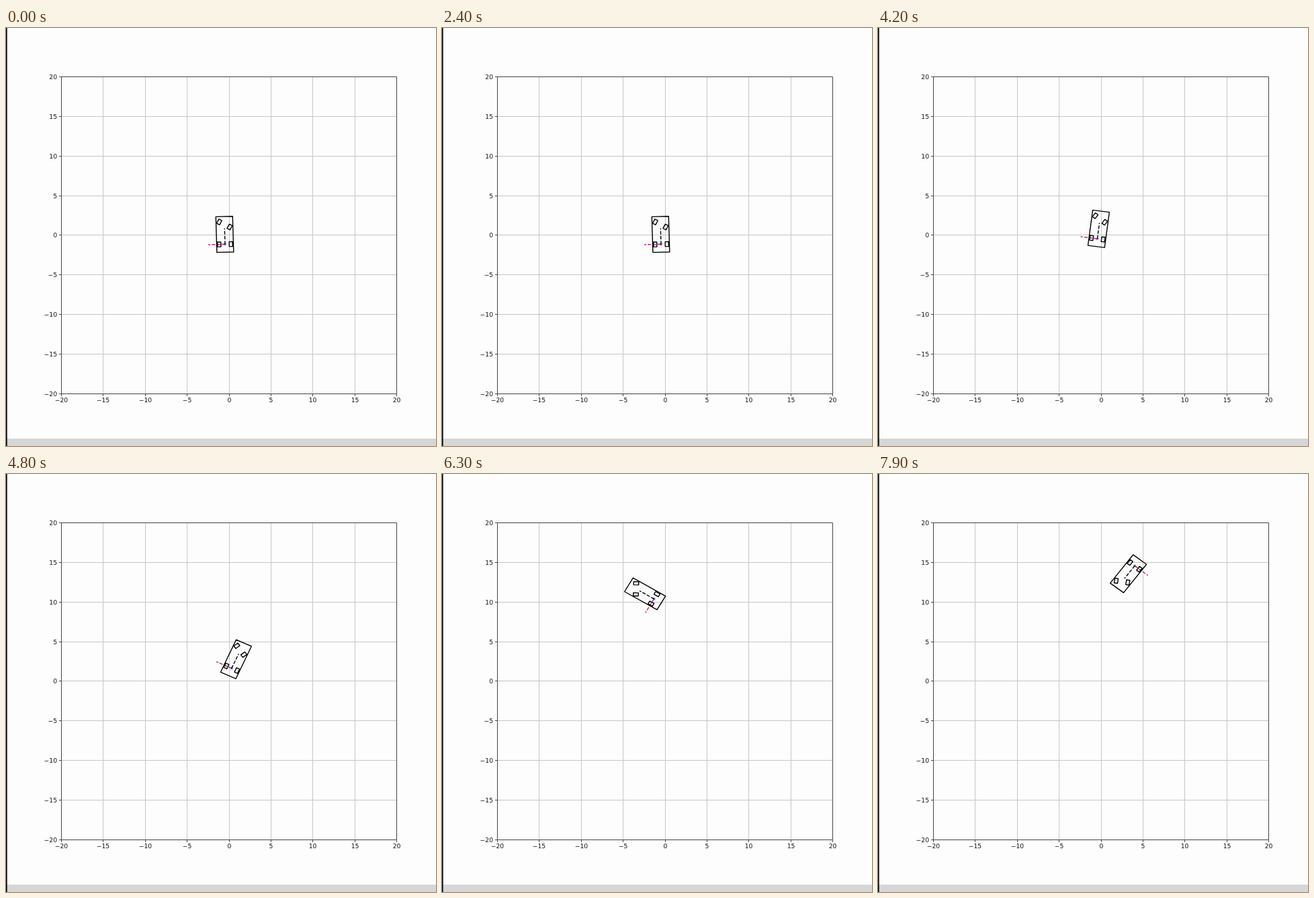
Animation of 640 by 621 pixels, one loop 8000 ms. Source, as an HTML page:

```html
<!DOCTYPE html>
<html lang="en">
<head>
<meta charset="utf-8">
<title>Car kinematics</title>
<style>
  html, body { margin: 0; width: 100%; height: 100%; overflow: hidden; background: #fdfdfd; }
  svg { display: block; width: 640px; height: 621px; }
  text { font: 9.2px "DejaVu Sans", sans-serif; fill: #111; }
  path { fill: none; }
  .grid { stroke: #c6c6c2; }
  .frame { stroke: #444448; }
  .car { stroke: #000; stroke-width: 1.4; stroke-linejoin: round; }
  .dash { stroke: #000; stroke-width: 1.4; stroke-dasharray: 5.1 2.2; }
  .side { stroke: #a8207c; }
</style>
</head>
<body>
<svg viewBox="0 0 640 621">
  <rect width="640" height="621" fill="#fdfdfd"/>
  <rect y="610" width="640" height="11" fill="#d6d6d6"/>
  <rect width="1.7" height="621" fill="#0a0a0a"/>
  <path id="grid" class="grid"/>
  <path id="frame" class="frame"/>
  <g id="labels"></g>
  <path id="star" style="fill:#4a66c8"/>
  <path id="side" class="dash side"/>
  <path id="nose" class="dash"/>
  <path id="car" class="car"/>
  <path id="cursor" d="M0 0V10.5L2.4 8.3L4.3 12.4L6 11.6L4.2 7.6H7.4Z"
        style="fill:#1a1a1a;stroke:#e4e4e4;stroke-width:.6"/>
</svg>
<script>
const LOOP = 8000, STEP = 100, RAD = Math.PI / 180;
const WHEELBASE = 2.5, TREAD = 0.7, LOCK = 0.5;
const RADIUS = WHEELBASE / Math.tan(LOCK);
const { sin, cos, abs, sign, min, max } = Math;
const el = id => document.getElementById(id);
const draw = (id, d) => el(id).setAttribute('d', d);

// Plot units to pixels
const px = ([x, y]) => [332 + 12.475 * x, 307.5 - 11.775 * y];
const line = pts => 'M' + pts.map(p => px(p).map(n => n.toFixed(2)).join(' ')).join('L');

// The car always steers at full lock; these are the headings where the lock flips.
const headings = [91.6, 60.4, 65.7, 54.6, 120, 110.3, 164.4, 228, 222, 243, 225];
const BACK_FROM = 6;
const FORWARD = { start: 3.62, accel: 4.2, top: 7 };
const REVERSE = { start: 6.64, accel: 12, top: 9.2 };
const BRAKE = 6.3;

// Distance covered when speeding up evenly to a top speed
function run(t, { start, accel, top }) {
  const u = max(0, t - start), ramp = top / accel;
  return u < ramp ? accel * u * u / 2 : top * (u - ramp / 2);
}

function distance(t) {
  const stop = REVERSE.start - BRAKE;
  const w = min(max(0, t - BRAKE), stop);
  return run(min(t, BRAKE), FORWARD) + FORWARD.top * (w - w * w / (2 * stop)) + run(t, REVERSE);
}

// Follow the arcs until the distance is used up
function poseAt(t) {
  let left = distance(t), x = -0.48, y = -1.17, yaw = headings[0] * RAD, steer;
  for (let i = 0; i < headings.length - 1; i++) {
    const swing = headings[i + 1] * RAD - yaw;
    const next = yaw + sign(swing) * min(abs(swing), left / RADIUS);
    const hand = sign(swing) * (i < BACK_FROM ? 1 : -1);
    x += RADIUS * hand * (sin(next) - sin(yaw));
    y -= RADIUS * hand * (cos(next) - cos(yaw));
    left -= abs(swing) * RADIUS;
    yaw = next;
    steer = hand * LOCK;
    if (left <= 0) break;
  }
  return { x, y, yaw, steer };
}

const turn = ([x, y], r) => [x * cos(r) - y * sin(r), x * sin(r) + y * cos(r)];
const shift = ([x, y], dx, dy) => [x + dx, y + dy];
const box = (x0, x1, y0, y1) => [[x0, y0], [x1, y0], [x1, y1], [x0, y1]];

function drawCar(t) {
  const { x, y, yaw, steer } = poseAt(t);
  const place = p => shift(turn(p, yaw), x, y);
  const shapes = [box(-1, 3.5, -1, 1)];
  for (const side of [-TREAD, TREAD]) {
    const wheel = box(-0.3, 0.3, side - 0.2, side + 0.2);
    shapes.push(wheel, wheel.map(p => shift(turn(p, steer), WHEELBASE, 0)));
  }
  draw('car', shapes.map(s => line(s.map(place)) + 'Z').join(''));
  draw('nose', line([[x, y], place([2, 0])]));
  draw('side', line([[x, y], place([0, 2])]));

  const [cx, cy] = px([x, y]);
  const tips = Array.from({ length: 10 }, (_, i) => {
    const r = i % 2 ? 1.2 : 3, a = i * Math.PI / 5;
    return `${cx + r * sin(a)} ${cy - r * cos(a)}`;
  });
  draw('star', 'M' + tips.join('L') + 'Z');
}

// The pointer crosses the lower left corner in a straight line
function drawPointer(t) {
  const u = t - 1.3, cursor = el('cursor');
  cursor.setAttribute('visibility', abs(u) < 0.6 ? 'visible' : 'hidden');
  cursor.setAttribute('transform', `translate(${26 - 44 * u} ${468 - 180 * u})`);
}

function drawAxes() {
  const name = n => String(n).replace('-', '\u2212');
  let grid = '', frame = 'M82.5 72.5H581.5V543.5H82.5Z', labels = '';
  for (let k = 0; k <= 8; k++) {
    const x = Math.round(82 + 62.375 * k) + 0.5;
    const y = Math.round(72 + 58.85 * k) + 0.5;
    if (k % 8) grid += `M${x} 73V543M83 ${y}H581`;
    frame += `M${x} 543.5v3.5M82.5 ${y}h-3.5`;
    labels += `<text x="${x}" y="555.8" text-anchor="middle">${name(5 * k - 20)}</text>`
            + `<text x="76" y="${y + 3.4}" text-anchor="end">${name(20 - 5 * k)}</text>`;
  }
  draw('grid', grid);
  draw('frame', frame);
  el('labels').innerHTML = labels;
}

const start = performance.now();
function tick() {
  const ms = (performance.now() - start) % LOOP;
  const t = Math.floor(ms / STEP) * STEP / 1000;
  drawCar(t);
  drawPointer(t);
  requestAnimationFrame(tick);
}
drawAxes();
tick();
</script>
</body>
</html>
```
